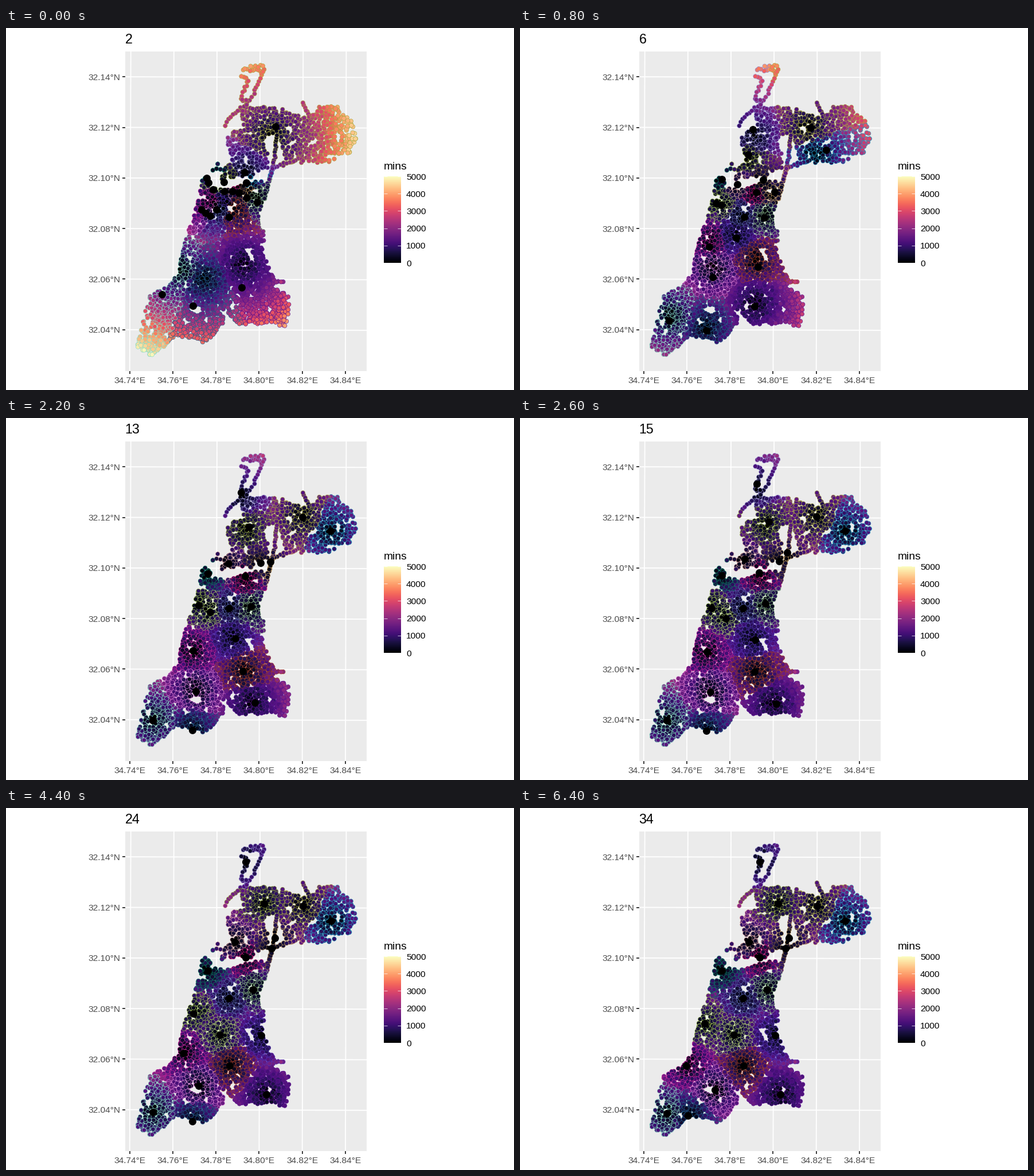
Animation, 886 px wide and 632 px high, one loop 6600 ms. Source, as a matplotlib script:

```python
import numpy as np
import matplotlib as mpl
import matplotlib.pyplot as plt
from matplotlib.animation import FuncAnimation
from matplotlib.path import Path

W, H, DPI = 886, 632, 64
PX = 72 / DPI                      # points per pixel
FIRST, STEPS, INTERVAL = 2, 33, 200
MINS_PER_PX, MAX_MINS = 31, 5000

mpl.rcParams["font.family"] = "Liberation Sans"
rng = np.random.default_rng(7)
magma = mpl.colormaps["magma"]

fig = plt.figure(figsize=(W / DPI, H / DPI), dpi=DPI, facecolor="white")
ax = fig.add_axes([0, 0, 1, 1])
ax.axis("off")


def label(x, y, text, size=15.46, color="black", ha="left"):
    """Text whose capitals are centred on y."""
    return ax.text(x, y + 0.358 * size, text, fontsize=size * PX,
                   color=color, ha=ha, va="baseline")


def line(xs, ys, color, width=1.87, z=1):
    ax.plot(xs, ys, color=color, lw=width * PX, solid_capstyle="butt", zorder=z)


# ---------- panel, graticule and axis labels ----------

LEFT, RIGHT, TOP, BOTTOM, TICK = 208, 629.5, 41, 599, 4.8
ax.add_patch(plt.Rectangle((LEFT, TOP), RIGHT - LEFT, BOTTOM - TOP,
                           fc="#EBEBEB", ec="none", zorder=0))
for i in range(6):
    x = 215.7 + 75.25 * i
    line([x + 2.0 - 0.1 * i, x], [TOP, BOTTOM], "white")
    line([x, x], [BOTTOM, BOTTOM + TICK], "#333333")
    label(x, 614, f"{34.74 + 0.02 * i:.2f}°E", color="#4D4D4D", ha="center")

    y = 85.2 + 88.3 * i
    line([LEFT, RIGHT], [y, y + 1.1], "white")
    line([LEFT - TICK, LEFT], [y, y], "#333333")
    label(199.4, y, f"{32.14 - 0.02 * i:.2f}°N", color="#4D4D4D", ha="right")

title = label(207.5, 19, str(FIRST), 23.2)

# ---------- colour bar ----------

BAR_L, BAR_R, BAR_T, BAR_B = 659, 689, 259, 410
ax.imshow(np.linspace(1, 0, 256)[:, None], cmap=magma, aspect="auto",
          extent=(BAR_L, BAR_R, BAR_B, BAR_T), zorder=1)
label(659, 240, "mins", 19.3)
for v in range(0, MAX_MINS + 1, 1000):
    y = BAR_B + (BAR_T - BAR_B) * v / MAX_MINS
    line([BAR_L, BAR_L + 6], [y, y], "white", 0.7, 2)
    line([BAR_R - 6, BAR_R], [y, y], "white", 0.7, 2)
    label(698, y, str(v))

# ---------- places on the map ----------


def fill(pitch, *outline):
    """Loosely jittered grid of points inside an outline."""
    o = np.array(outline, float)
    (x0, y0), (x1, y1) = o.min(axis=0), o.max(axis=0)
    p = np.stack(np.meshgrid(np.arange(x0, x1 + pitch, pitch),
                             np.arange(y0, y1 + pitch, pitch)), -1).reshape(-1, 2)
    p += rng.uniform(-0.75, 0.75, p.shape) * pitch
    return p[Path(o).contains_points(p)]


def road(a, b, c, gap=4.5):
    """Points strung from a through b to c."""
    r = np.array([a, b, c], float)
    s = np.r_[0, np.cumsum(np.hypot(*np.diff(r, axis=0).T))]
    t = np.arange(0, s[-1], gap)
    p = np.column_stack([np.interp(t, s, r[:, 0]), np.interp(t, s, r[:, 1])])
    return p + rng.normal(0, 1, p.shape)


south = fill(4.4, (340, 260), (355, 260), (361, 279), (386, 280), (448, 265),
             (455, 276), (440, 335), (452, 362), (448, 385), (468, 450),
             (494, 470), (492, 512), (410, 519), (390, 502), (350, 550),
             (300, 538), (252, 574), (227, 555), (250, 468), (291, 444),
             (312, 375), (336, 298))
centre = fill(5, (374, 264), (374, 250), (395, 235), (384, 205), (388, 180),
              (411, 178), (409, 122), (424, 122), (428, 137), (484, 140),
              (484, 186), (452, 188), (450, 212), (459, 222), (456, 250),
              (424, 262))
east = fill(5, (482, 144), (528, 157), (545, 135), (577, 137), (606, 165),
            (611, 195), (600, 217), (560, 236), (490, 235), (477, 200))
roads = [
    road((472, 186), (470, 220), (451, 300)),
    road((490, 236), (466, 244), (449, 300)),
    road((518, 131), (523, 143), (531, 156)),
    road((410, 140), (390, 156), (380, 176), 6),
    road((462, 430), (470, 441), (487, 445)),
    road((474, 511), (480, 520), (489, 520)),
    road((361, 250), (370, 239), (377, 250), 7),
    road((413, 72), (437, 66), (452, 68)),
    road((451, 72), (440, 95), (428, 122), 6),
    road((411, 84), (424, 90), (409, 126), 5),
    road((426, 75), (440, 72), (446, 80)),
]
places = np.vstack([south, centre, east, *roads])

# Small unbuilt gaps, scattered by seed, and one larger park.
gaps = rng.uniform((230, 130), (610, 550), (70, 2))
far = np.hypot(*(places[:, None] - gaps).transpose(2, 0, 1)).min(axis=1) > 5.5
park = np.hypot(*(places - (334, 492)).T) < 9
places = places[far & ~park]
rng.shuffle(places)
noise = rng.normal(0, 110, len(places))

# ---------- cluster centres ----------

HUB, PULL, RATE = np.array([430, 250]), 0.2, 0.3
paths, edges = [], []


def track(color, start, via, end, stop, turn=9):
    """Rush out from start to via, then drift evenly to end by step stop."""
    start, via, end = np.array([start, via, end], float)
    n = np.arange(FIRST, FIRST + STEPS)[:, None]
    rush = np.clip((1 - np.exp(-RATE * (n - FIRST)))
                   / (1 - np.exp(-RATE * (turn - FIRST))), 0, 1)
    drift = np.clip((n - turn) / (stop - turn), 0, 1)
    moving = start + (via - start) * rush + (end - via) * drift
    paths.append(np.vstack([start + PULL * (HUB - start), moving]))
    edges.append(mpl.colors.to_rgb(color))


track("#86DCC4", (272, 465), (256, 528), (256, 533), 34, 13)
track("#1E5C88", (326, 485), (325, 547), (293, 537), 34, 24)
track("#D374CE", (348, 323), (331, 477), (340, 492), 34, 13)
track("#C4219A", (341, 317), (326, 408), (290, 450), 34, 15)
track("#5A1290", (411, 453), (408, 494), (454, 500), 16)
track("#A23C22", (389, 330), (422, 439), (390, 450), 24)
track("#5330B4", (367, 317), (380, 379), (445, 397), 22)
track("#5A66AE", (356, 328), (400, 330), (389, 332), 13)
track("#8FC08A", (438, 304), (423, 338), (431, 317), 18)
track("#9CBF4E", (353, 270), (339, 315), (322, 376), 30)
track("#A9C766", (361, 282), (349, 316), (373, 396), 23)
track("#087A62", (350, 262), (352, 265), (352, 284), 20)
track("#DDA5A0", (381, 285), (379, 270), (399, 234), 18)
track("#C4126E", (395, 285), (416, 288), (418, 261), 18)
track("#8A9E34", (380, 269), (403, 209), (450, 167), 18)
track("#7A5A3A", (406, 288), (429, 259), (463, 245), 18)
track("#CDA562", (420, 296), (450, 283), (469, 227), 16)
track("#8E88CC", (416, 252), (404, 158), (418, 94), 18)
track("#A8A83E", (470, 172), (516, 174), (518, 171), 18)
track("#1E9CC0", (419, 270), (564, 198), (567, 197), 14)

paths, edges = np.array(paths), np.array(edges)

dots = ax.scatter(*places.T, s=(7.4 * PX) ** 2, linewidths=0.65 * PX, zorder=3)
hubs = ax.scatter(*paths[:, 1].T, s=(13 * PX) ** 2, c="black",
                  linewidths=0, zorder=4)
ax.set_xlim(0, W)
ax.set_ylim(H, 0)


def draw(i):
    # Places are coloured by the previous centres; hubs show the new ones.
    gap = places[:, None] - paths[None, :, i]
    dist = np.hypot(gap[..., 0], gap[..., 1])
    mins = MINS_PER_PX * dist.min(axis=1) + noise
    dots.set_facecolor(magma(np.clip(mins / MAX_MINS, 0, 1)))
    dots.set_edgecolor(edges[dist.argmin(axis=1)])
    hubs.set_offsets(paths[:, i + 1])
    title.set_text(str(FIRST + i))
    return dots, hubs, title


anim = FuncAnimation(fig, draw, frames=STEPS, interval=INTERVAL, repeat=True)
plt.show()
```
